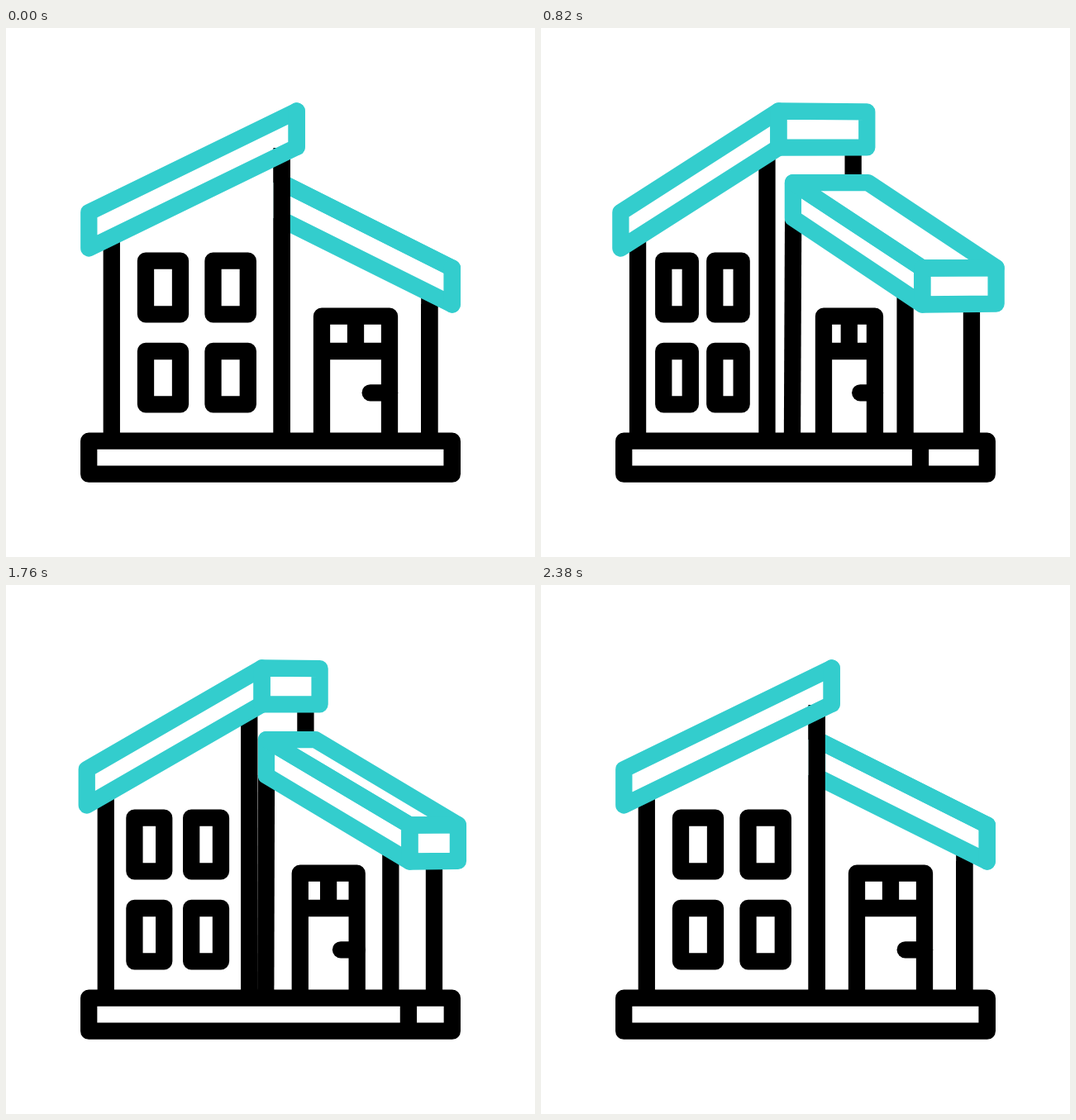
Write an HTML page with a canvas that moves like this. It is 640 by 640 pixels and loops after 2.4 s.

```html
<!DOCTYPE html>
<html lang="en">
<head>
<meta charset="utf-8">
<title>Turning house</title>
<style>
html, body { margin: 0; width: 100%; height: 100%; overflow: hidden; background: #fff; }
canvas { display: block; width: 640px; height: 640px; }
</style>
</head>
<body>
<canvas id="stage" width="640" height="640"></canvas>
<script>
const ctx = document.getElementById('stage').getContext('2d');
const LOOP = 2400;
const INK = '#000';
const TEAL = '#33cdcd';

// Symmetric cubic-bezier(.8, 0, .2, 1)
function ease(x) {
  if (x <= 0) return 0;
  if (x >= 1) return 1;
  let lo = 0, hi = 1;
  for (let i = 0; i < 24; i++) {
    const s = (lo + hi) / 2, r = 1 - s;
    if (2.4 * s * r * r + 0.6 * s * s * r + s * s * s < x) lo = s;
    else hi = s;
  }
  return lo * lo * (3 - 2 * lo);
}

function turnAt(time) {
  return ease(Math.min(time / 1204, (2385 - time) / 1200));
}

function path(color, points, closed = false, cap = 'butt') {
  ctx.strokeStyle = color;
  ctx.lineCap = cap;
  ctx.beginPath();
  points.forEach(([x, y]) => ctx.lineTo(x, y));
  if (closed) ctx.closePath();
  ctx.stroke();
}

function box(left, top, right, bottom) {
  path(INK, [[left, top], [right, top], [right, bottom], [left, bottom]], true);
}

function post(x, top, bottom = 500, foot = x) {
  path(INK, [[x, top], [foot, bottom]]);
}

function draw(time) {
  const p = turnAt(time);
  const mix = (front, turned) => front + (turned - front) * p;

  ctx.fillStyle = '#fff';
  ctx.fillRect(0, 0, 640, 640);
  ctx.lineWidth = 20.3;
  ctx.lineJoin = 'round';

  // Walls behind the low roof
  post(mix(333.6, 382), 145, 187);
  post(mix(512.3, 521.8), 334);
  post(mix(333.7, 302.3), 230, 500, mix(333.7, 301));
  post(mix(512.3, 433.5), 321);

  // Door
  const doorL = mix(382, 338), doorR = mix(464, 398), bar = mix(423, 367.8);
  path(INK, [[doorL, 500], [doorL, 348.7], [doorR, 348.7], [doorR, 500]]);
  path(INK, [[doorL, 391], [doorR, 391]]);
  post(bar, 348.7, 391);
  path(INK, [[mix(440.7, 380.8), 441.3], [doorR, 441.3]], false, 'round');

  // Low roof
  const lowL = mix(334, 302), lowR = mix(539.8, 453.5);
  const sideR = mix(539.8, 551.7), sideTop = mix(290.5, 290);
  path(TEAL, [[lowL, 187.2], [lowR, 290.5], [lowR, 334.5], [lowL, mix(232, 229.7)]], true);
  path(TEAL, [[lowL, 187.2], [mix(334, 402), 187.2], [sideR, sideTop], [lowR, 290.5]], true);
  path(TEAL, [[lowR, 290.5], [sideR, sideTop], [sideR, mix(334.5, 333.5)], [lowR, 334.5]], true);

  // Tower front
  post(mix(127.8, 116), 253);
  post(mix(333.7, 267.5), 153);
  for (const [top, bottom] of [[281.7, 346.3], [391, 455.3]]) {
    box(mix(169, 146.2), top, mix(211, 177.8), bottom);
    box(mix(250.5, 206.3), top, mix(292.8, 237.7), bottom);
  }

  // Tower roof
  const roofL = mix(100.3, 96), ridge = mix(351.7, 281), roofR = mix(351.7, 398.5);
  const ridgeLow = mix(144, 144.7);
  path(TEAL, [[roofL, 223], [ridge, 100.5], [ridge, ridgeLow], [roofL, 266.5]], true);
  path(TEAL, [[ridge, 100.5], [roofR, mix(100.5, 101.4)], [roofR, mix(144, 144.5)], [ridge, ridgeLow]], true);

  // Base
  box(100.2, 499.7, 539.8, 539.7);
  post(mix(539.8, 451), 500, 540);
}

function tick() {
  draw(performance.now() % LOOP);
  requestAnimationFrame(tick);
}
tick();
</script>
</body>
</html>
```
